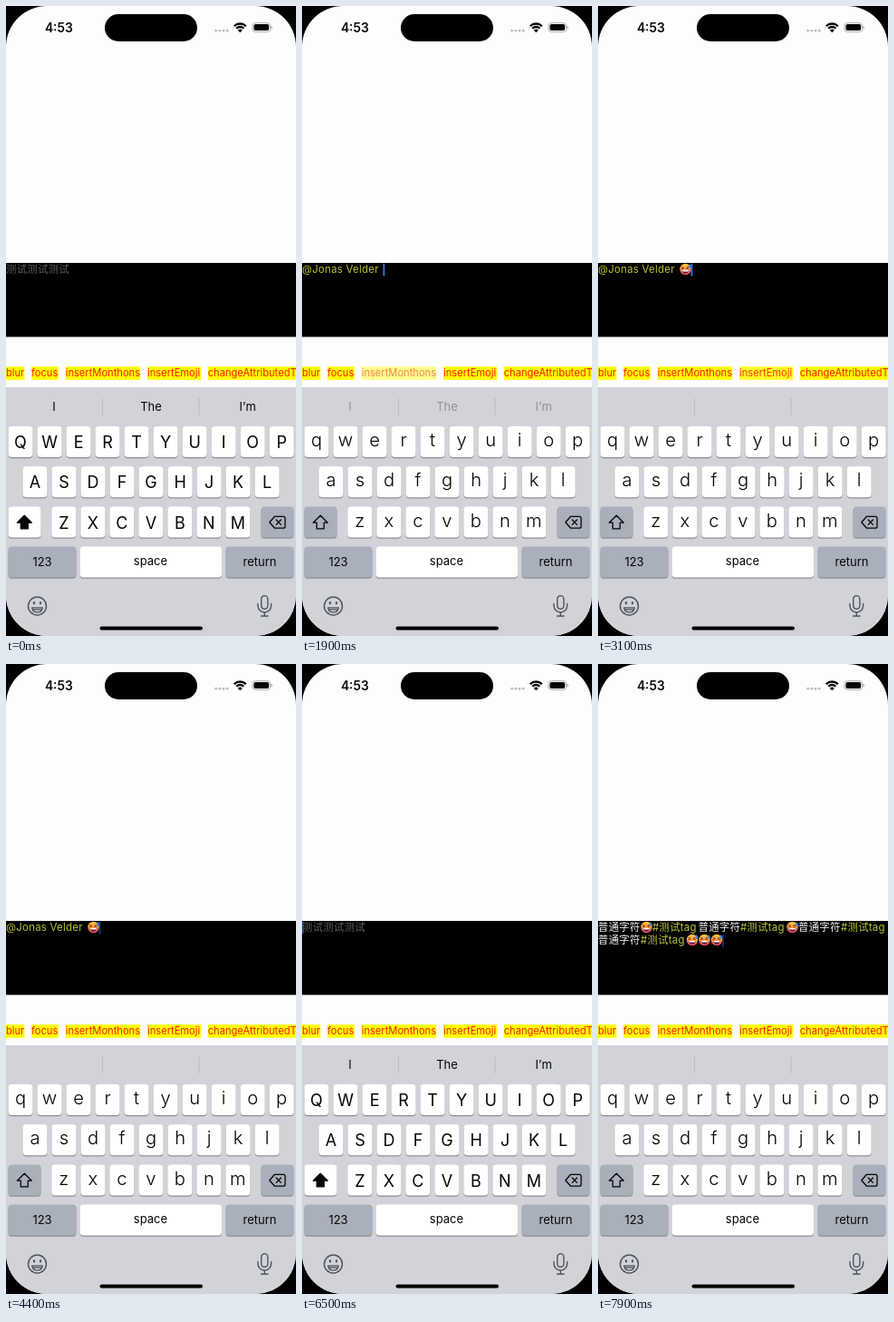
Recreate the animation shown at these times as an HTML page with a canvas. Size 320 by 694 pixels, loop 8000 ms.

```html
<!DOCTYPE html>
<html lang="zh-Hans">
<head>
<meta charset="utf-8">
<title>Rich text input</title>
<style>
html, body { margin: 0; width: 100%; height: 100%; overflow: hidden; background: #000; }
canvas { display: block; width: 320px; height: 694px; }
</style>
</head>
<body>
<canvas id="stage"></canvas>
<script>
const LOOP = 8000;
const SANS = "Inter, 'Noto Sans CJK SC', 'Noto Sans CJK', sans-serif";
const INK = '#050505', TAG = '#b9c52f', PLAIN = '#f4f4f4', HINT = '#5c5c5e';
const GREY_KEY = '#a9afbb', PANEL = '#d1d3d9', GLYPH = '#50545b';

// Moments when the content of the field changes
const MENTION = 1700, EMOJI = 2700, ERASE_EMOJI = 4800, ERASE_ALL = 5500, RICH = 6950;

const canvas = document.getElementById('stage');
const ctx = canvas.getContext('2d');
const dpr = window.devicePixelRatio || 1;
canvas.width = 320 * dpr;
canvas.height = 694 * dpr;

const clamp = v => Math.max(0, Math.min(1, v));
const ramp = (t, from, to) => clamp((t - from) / (to - from));
const between = (t, from, to) => t >= from && t < to;

// Linear interpolation through [time, value] points
function track(points, t) {
  let value = points[0][1];
  for (let i = 1; i < points.length; i++) {
    const [a, v] = points[i - 1], [b, w] = points[i];
    if (t >= a) value = v + (w - v) * ramp(t, a, b);
  }
  return value;
}

function box(x, y, w, h, r, fill) {
  ctx.beginPath();
  ctx.roundRect(x, y, w, h, r);
  ctx.fillStyle = fill;
  ctx.fill();
}

function text(str, x, y, { size = 11.4, weight = 400, color = INK, align = 'left', spacing = 0 } = {}) {
  ctx.font = `${weight} ${size}px ${SANS}`;
  ctx.letterSpacing = spacing + 'px';
  ctx.textAlign = align;
  ctx.fillStyle = color;
  ctx.fillText(str, x, y);
}

function circle(x, y, r, fill) {
  ctx.beginPath();
  ctx.arc(x, y, r, 0, Math.PI * 2);
  ctx.fillStyle = fill;
  ctx.fill();
}

function strokePath(d, color, width) {
  ctx.strokeStyle = color;
  ctx.lineWidth = width;
  ctx.stroke(new Path2D(d));
}

function statusBar() {
  text('4:53', 58.3, 28.6, { size: 13.8, weight: 600, align: 'center' });
  box(109, 9, 102, 30, 15, '#000');
  for (let i = 0; i < 4; i++) circle(231.6 + i * 4.2, 27.2, 1.4, '#bcbcbe');

  ctx.lineCap = 'butt';
  for (const r of [9.3, 5.8]) {
    ctx.beginPath();
    ctx.arc(258.3, 28.8, r, -Math.PI * 0.75, -Math.PI * 0.25);
    ctx.strokeStyle = INK;
    ctx.lineWidth = 2.3;
    ctx.stroke();
  }
  ctx.beginPath();
  ctx.moveTo(258.3, 29.3);
  ctx.arc(258.3, 29.3, 3.6, -Math.PI * 0.75, -Math.PI * 0.25);
  ctx.fillStyle = INK;
  ctx.fill();

  ctx.beginPath();
  ctx.roundRect(272, 18.7, 19.6, 9.8, 3.2);
  ctx.strokeStyle = '#a5a5a7';
  ctx.lineWidth = 0.9;
  ctx.stroke();
  box(273.4, 20.1, 16.8, 7, 2, INK);
  box(292.5, 22, 1.2, 3.2, 0.6, '#a5a5a7');
}

function emoji(x, y) {
  ctx.save();
  ctx.translate(x + 6.5, y);
  const skin = ctx.createLinearGradient(0, -6, 0, 6);
  skin.addColorStop(0, '#ffc53d');
  skin.addColorStop(0.5, '#fb9a3e');
  skin.addColorStop(1, '#ee4a72');
  circle(0, 0, 6.2, skin);
  ctx.lineCap = 'round';
  strokePath('M-4 -2.6L-1.7 -1.3L-4 -.5M3.2 -2.6L1 -1.3L3.2 -.5', '#5b2424', 0.9);
  ctx.fillStyle = '#6b1732';
  ctx.fill(new Path2D('M-4 1H4C3.7 6-3.7 6-4 1Z'));
  ctx.fillStyle = '#fff';
  ctx.fill(new Path2D('M-3.6 1H3.6L3.2 2.5H-3.2Z'));
  ctx.fillStyle = '#3f82df';
  ctx.fill(new Path2D('M4.5 -6C6.7 -3.4 7 -1.5 5.2 -1.2C3.2 -1 3.3 -3.5 4.5 -6Z'));
  ctx.restore();
}

// Items are [x, what]; '*' stands for the inline emoji
function line(items, y) {
  for (const [x, what] of items) {
    if (what === '*') emoji(x, y - 4);
    else text(what, x, y, { color: what[0] === '#' ? TAG : PLAIN, spacing: 0.27 });
  }
}

const cursorBlink = [
  [0, 0], [60, 0], [200, 1], [640, 1], [800, 0], [940, 0], [1160, 1], [2340, 1], [2480, 0],
  [2640, 0], [2700, 1], [3350, 1], [3500, 0], [3640, 0], [3860, 1], [4330, 1], [4490, 0],
  [4640, 0], [4800, 1], [5360, 1], [5450, 0], [5500, 1], [6080, 1], [6230, 0], [6380, 0],
  [6580, 1], [7540, 1], [7690, 0], [7840, 0], [7980, 1]
];

function field(t) {
  ctx.fillStyle = '#000';
  ctx.fillRect(0, 283, 320, 81.5);
  let caretX = 0, caretY = 283.5;

  if (between(t, MENTION, ERASE_ALL)) {
    text('@Jonas Velder', 0, 294, { color: TAG, spacing: 0.27 });
    caretX = 89.5;
    if (between(t, EMOJI, ERASE_EMOJI)) {
      emoji(90, 290);
      caretX = 102.5;
    }
  } else if (t >= RICH) {
    line([[0, '普通字符'], [47, '*'], [60, '#测试tag'], [110.5, '普通字符'], [157, '#测试tag'],
      [208, '*'], [221, '普通字符'], [268, '#测试tag']], 294);
    line([[0, '普通字符'], [47, '#测试tag'], [97.5, '*'], [111, '*'], [124.5, '*']], 308);
    caretX = 137;
    caretY = 298;
  } else {
    text('测试测试测试', 0, 294, { color: HINT, spacing: 0.27 });
  }

  ctx.globalAlpha = track(cursorBlink, t);
  box(caretX, caretY, 1.8, 14, 0.8, '#3d74e6');
  ctx.globalAlpha = 1;
}

const actions = [
  { label: 'blur', x: 0, w: 20.3 },
  { label: 'focus', x: 28, w: 29.8 },
  { label: 'insertMonthons', x: 65.7, w: 82.5, tap: MENTION },
  { label: 'insertEmoji', x: 156, w: 59, tap: EMOJI },
  { label: 'changeAttributedText', x: 222.7, w: 112, tap: RICH }
];

function toolbar(t) {
  for (const { label, x, w, tap } of actions) {
    const lit = tap === undefined || t < tap - 60 ? 1 : 0.15 + 0.85 * ramp(t, tap + 50, tap + 470);
    ctx.globalAlpha = lit;
    box(x, 397.3, w, 14.4, 0, '#ffff00');
    if (lit < 1) {
      ctx.globalAlpha = 1 - lit;
      text(label, x, 408, { size: 11.15, color: '#d6d0b8' });
    }
    ctx.globalAlpha = lit;
    text(label, x, 408, { size: 11.15, color: '#ff1a00' });
    ctx.globalAlpha = 1;
  }
}

function suggestions(t) {
  for (const x of [106, 212.7]) box(x, 432, 0.9, 19, 0, '#b9bbc1');
  const outStart = t < ERASE_ALL ? MENTION + 90 : RICH + 100;
  const out = 1 - ramp(t, outStart, outStart + 160);
  const words = [['I', 53], ['The', 160], ['I’m', 266.5]];
  for (const [word, center] of words) {
    ctx.font = `400 13px ${SANS}`;
    ctx.letterSpacing = '0px';
    let x = center - ctx.measureText(word).width / 2;
    [...word].forEach((letter, i) => {
      const start = ERASE_ALL + 60 + i * 50;
      const grow = t < ERASE_ALL ? 1 : ramp(t, start, start + 150);
      ctx.font = `400 13px ${SANS}`;
      const advance = ctx.measureText(letter).width;
      const size = 13 * (0.6 + 0.4 * grow);
      ctx.globalAlpha = between(t, outStart + 160, ERASE_ALL) ? 0 : grow * out;
      text(letter, x + advance / 2, 446 - (13 - size) * 0.36, { size, align: 'center' });
      x += advance;
    });
  }
  ctx.globalAlpha = 1;
}

function key(x, y, w, fill = '#fff') {
  box(x, y + 1, w, 34.2, 4, '#8d8f95');
  box(x, y, w, 34, 4, fill);
}

function letterRow(letters, x, y, upper) {
  [...letters].forEach((letter, i) => {
    const left = x + i * 32.02;
    key(left, y, 27);
    const style = { size: upper ? 18 : 20.2, weight: upper ? 400 : 300, align: 'center' };
    text(upper ? letter : letter.toLowerCase(), left + 13.5, y + (upper ? 24 : 22), style);
  });
}

function deleteKey(pressed) {
  key(281.5, 551.5, 36, pressed ? '#fff' : GREY_KEY);
  const outline = 'M296.5 562.3H306Q308 562.3 308 564.3V573.2Q308 575.2 306 575.2H296.5L290.8 568.7Z';
  if (pressed) {
    ctx.fillStyle = INK;
    ctx.fill(new Path2D(outline));
  }
  strokePath(outline, INK, 1.3);
  strokePath('M298.2 566L303.4 571.4M303.4 566L298.2 571.4', pressed ? '#fff' : INK, 1.3);
}

function keyboard(t) {
  const upper = t < MENTION || between(t, ERASE_ALL, RICH);
  ctx.fillStyle = PANEL;
  ctx.fillRect(0, 420, 320, 274);
  suggestions(t);

  letterRow('QWERTYUIOP', 2.5, 463, upper);
  letterRow('ASDFGHJKL', 18.5, 507.3, upper);
  letterRow('ZXCVBNM', 50.3, 551.5, upper);

  ctx.lineCap = ctx.lineJoin = 'round';
  key(2.5, 551.5, 36, upper ? '#fff' : GREY_KEY);
  const arrow = 'M20.3 561.3L28.3 569.2H24.3V575.8H16.3V569.2H12.3Z';
  if (upper) {
    ctx.fillStyle = INK;
    ctx.fill(new Path2D(arrow));
  }
  strokePath(arrow, INK, 1.3);
  deleteKey(between(t, 4750, 4880) || between(t, 5390, 5510));

  key(2.5, 595.5, 75, GREY_KEY);
  key(81.5, 595.5, 156.5);
  key(242.5, 595.5, 75, GREY_KEY);
  text('123', 40, 617, { size: 13, align: 'center' });
  text('space', 159.5, 616, { size: 13, align: 'center' });
  text('return', 280, 617, { size: 13, align: 'center' });

  ctx.beginPath();
  ctx.arc(34.5, 661, 10, 0, Math.PI * 2);
  ctx.strokeStyle = GLYPH;
  ctx.lineWidth = 1.5;
  ctx.stroke();
  for (const x of [31, 38]) {
    ctx.beginPath();
    ctx.ellipse(x, 657.8, 1.2, 1.7, 0, 0, Math.PI * 2);
    ctx.fillStyle = GLYPH;
    ctx.fill();
  }
  strokePath('M28.7 662.8H40.3C39.5 669.5 29.5 669.5 28.7 662.8ZM29.5 664.8H39.5', GLYPH, 1.3);

  strokePath('M281.7 653.2a3.6 3.6 0 0 1 7.2 0v7.4a3.6 3.6 0 0 1 -7.2 0Z', GLYPH, 1.4);
  strokePath('M278 658.5v2.2a7.3 7.3 0 0 0 14.6 0v-2.2M285.3 668.2V672M281.5 672H289', GLYPH, 1.4);

  box(103.5, 683.6, 113.5, 4, 2, '#000');
}

function draw(t) {
  ctx.setTransform(dpr, 0, 0, dpr, 0, 0);
  ctx.fillStyle = '#000';
  ctx.fillRect(0, 0, 320, 694);
  ctx.save();
  ctx.beginPath();
  ctx.roundRect(0, 0, 320, 694, 45);
  ctx.clip();
  ctx.fillStyle = '#fdfdfd';
  ctx.fillRect(0, 0, 320, 694);
  statusBar();
  field(t);
  toolbar(t);
  keyboard(t);
  ctx.restore();
}

function frame() {
  draw(performance.now() % LOOP);
  requestAnimationFrame(frame);
}
frame();
</script>
</body>
</html>
```
